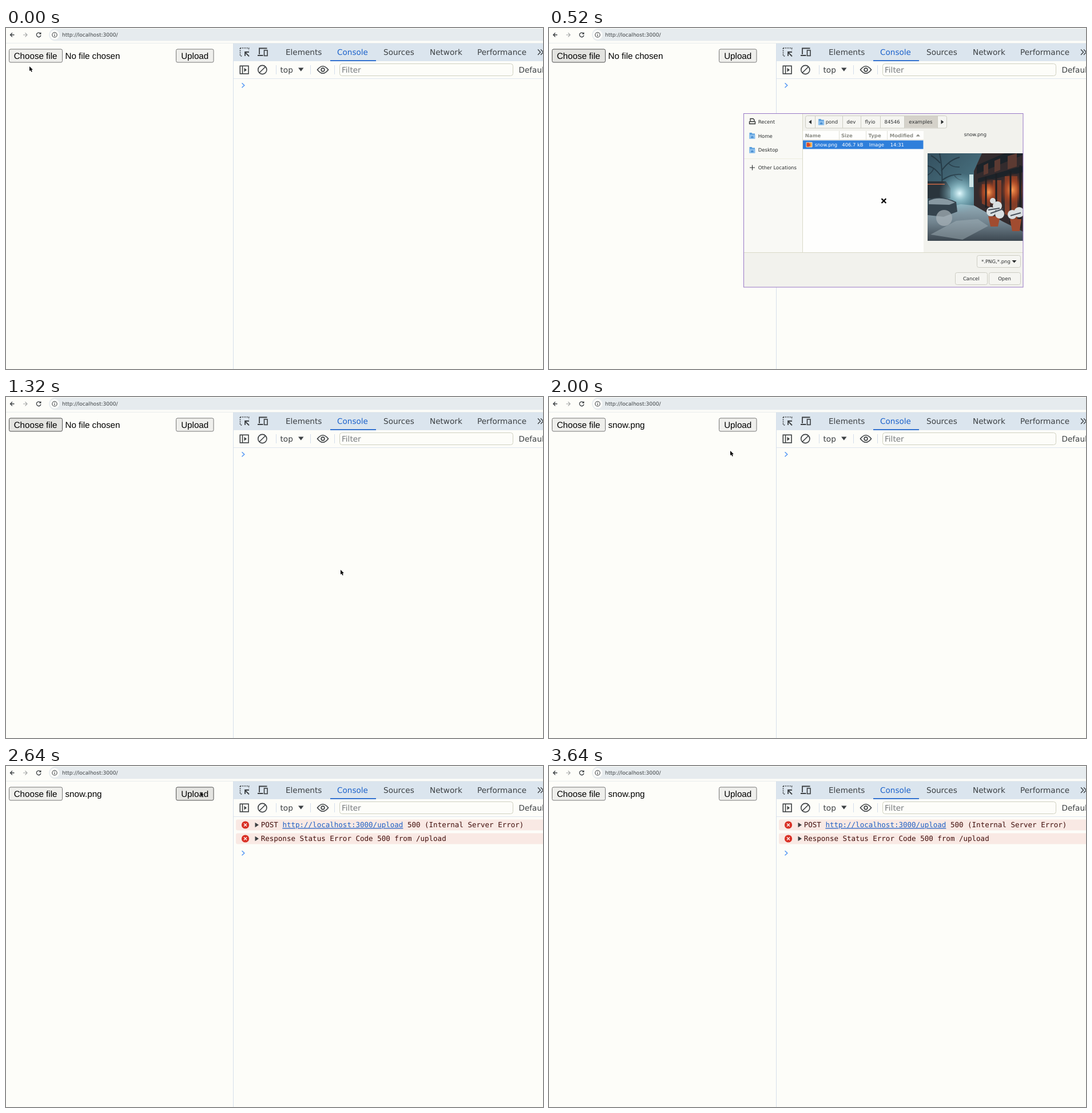
An HTML page that plays this animation: 939 by 596 pixels, repeating every 4.4 s.

```html
<!DOCTYPE html>
<html lang="en">
<head>
<meta charset="utf-8">
<title>File upload</title>
<style>
html, body { margin: 0; width: 100%; height: 100%; overflow: hidden; background: #fdfdf9; }
svg { display: block; width: 939px; height: 596px; text-rendering: geometricPrecision; }
text { white-space: pre; }
.ui { font: 13.6px "DejaVu Sans", sans-serif; fill: #3c4043; }
.page { font: 15.15px "Liberation Sans", Arial, sans-serif; fill: #000; }
.log { font: 12.52px "DejaVu Sans Mono", monospace; fill: #410e0b; }
.gtk { font: 8.5px "DejaVu Sans", sans-serif; fill: #2a2d2e; }
.head { font-weight: bold; fill: #8d8e87; }
.line { fill: none; stroke: #3c4043; stroke-width: 1.6; }
.btn { fill: #efefec; stroke: #767676; }
.gbtn { fill: #f5f5f1; stroke: #cdcdc3; }

/* Percentages are ms / 44, set a hair early so each change lands on its tick. */
.anim { animation: 4400ms step-end infinite; }
#arrow { animation-name: move; }
@keyframes move {
  0% { transform: translate(41px, 67px); animation-timing-function: steps(6); }
  5.44% { transform: translate(48px, 50px); }
  35.44% { transform: translate(585px, 302px); animation-timing-function: steps(5); }
  39.99% { transform: translate(432px, 184px); animation-timing-function: steps(6); }
  45.44% { transform: translate(317px, 94px); animation-timing-function: steps(3); }
  48.17% { transform: translate(325px, 70px); animation-timing-function: steps(7); }
  54.53% { transform: translate(340px, 45px); }
  73.62% { transform: translate(399px, 41px); animation-timing-function: steps(5); }
  78.17%, 100% { transform: translate(921px, 24px); }
}
#pointer { animation-name: pointer; }
@keyframes pointer {
  0%, 29.99% { visibility: visible; }
  9.08%, 81.8%, 100% { visibility: hidden; }
}
/* The arrow waits at the dialog's centre once the dialog has closed. */
#place { animation-name: place; }
@keyframes place {
  0%, 35.43%, 100% { transform: none; }
  29.99% { transform: translate(537px, 252px); }
}
#frame { animation-name: frame; }
@keyframes frame {
  0%, 29.99%, 100% { visibility: hidden; }
  9.08% { visibility: visible; }
}
#dialog { animation-name: dialog; }
@keyframes dialog {
  0%, 29.99%, 100% { visibility: hidden; }
  10.89% { visibility: visible; }
}
#next { animation-name: next; }
@keyframes next { 0% { fill: #2a2d2e; } 13.62% { fill: #5f605b; } 14.53%, 100% { fill: #95968e; } }
#open { animation-name: open; }
@keyframes open { 0% { fill: #f5f5f1; } 24.53%, 100% { fill: #d5d2ca; } }
#choose { animation-name: choose; }
@keyframes choose { 0%, 30.89%, 100% { fill: #efefec; stroke: #767676; } 2.71% { fill: #e3e3e0; stroke: #4f4f4f; } }
#upload { animation-name: upload; }
@keyframes upload { 0%, 74.53%, 100% { fill: #efefec; stroke: #767676; } 50.89% { fill: #e4e4e1; stroke: #4f4f4f; } }
#none { animation-name: none-chosen; }
@keyframes none-chosen { 0% { visibility: visible; } 30.89%, 100% { visibility: hidden; } }
#chosen { animation-name: chosen; }
@keyframes chosen { 0% { visibility: hidden; } 30.89%, 100% { visibility: visible; } }
#errors { animation-name: errors; }
@keyframes errors { 0% { visibility: hidden; } 59.08%, 100% { visibility: visible; } }
#prompt { animation-name: prompt; }
@keyframes prompt { 0% { transform: none; } 59.08%, 100% { transform: translateY(52px); } }
</style>
</head>
<body>
<svg viewBox="0 0 939 596">
  <defs>
    <linearGradient id="sky" x2="1" y2="1">
      <stop offset="0" stop-color="#34505f"/><stop offset=".5" stop-color="#4d7886"/><stop offset="1" stop-color="#283038"/>
    </linearGradient>
    <linearGradient id="ground" x2="0" y2="1">
      <stop offset="0" stop-color="#93adb8"/><stop offset=".5" stop-color="#71838e"/><stop offset="1" stop-color="#3c4750"/>
    </linearGradient>
    <radialGradient id="glow">
      <stop offset="0" stop-color="#e3fbff"/><stop offset=".35" stop-color="#9fd0da" stop-opacity=".75"/><stop offset="1" stop-color="#73a9b8" stop-opacity="0"/>
    </radialGradient>
    <radialGradient id="lamp">
      <stop offset="0" stop-color="#ff9b52"/><stop offset=".5" stop-color="#b04a25" stop-opacity=".8"/><stop offset="1" stop-color="#6a2a1c" stop-opacity="0"/>
    </radialGradient>
    <clipPath id="photo"><path d="M662 219h167v153h-167z"/></clipPath>
    <g id="folder">
      <path d="M.5 0h4l1 1.5h4.5v9h-9.5z" fill="#5a9fdd"/>
      <path d="M0 3.5h10.5v7h-10.5z" fill="#8fc1ee"/>
      <path d="M3 7.5l2.3-2 2.3 2v1.8h-4.6z" fill="#4a8ed0"/>
    </g>
    <g id="fault">
      <path d="M405-9.5h534v19h-534a3 3 0 0 1-3-3v-13a3 3 0 0 1 3-3z" fill="#f9e9e4"/>
      <circle cx="418.5" r="6.6" fill="#d93025"/>
      <path d="M416-2.5l5 5m0-5l-5 5" stroke="#fff" stroke-width="1.3"/>
      <path d="M435.500-4.300l6.500 4.300-6.500 4.300z" fill="#3c4043"/>
    </g>
  </defs>

  <!-- Address bar -->
  <path d="M939 1H86a10.800 10.800 0 0 0 0 21.600h853z" fill="#e6ebee"/>
  <path d="M0 26.500h939" stroke="#e8ecec"/>
  <path d="M14.500 12h-7m3.500-3.500l-3.500 3.500 3.500 3.500" class="line" stroke-width="1.2" style="stroke-width:1.3"/>
  <path d="M30 12h7m-3.500-3.500l3.500 3.500-3.500 3.500" class="line" style="stroke:#a6a8a8;stroke-width:1.2"/>
  <path d="M60.300 9.800a3.800 3.800 0 1 0 .6 2.800m-.1-4.800v2.500h-2.500" class="line" style="stroke-width:1.300"/>
  <circle cx="85" cy="12" r="8.300" fill="#fdfdfb"/>
  <circle cx="85" cy="12" r="4.200" class="line" style="stroke-width:1.100"/>
  <path d="M85 11.500v3m0-5v1.100" class="line" style="stroke-width:1.200"/>
  <text x="98" y="15.200" class="ui" style="font-size:9.070px">http://localhost:3000/</text>

  <!-- Page -->
  <g class="page">
    <rect id="choose" class="btn anim" x="5.500" y="37" width="93" height="23" rx="2.500"/>
    <text x="13.700" y="53.500">Choose file</text>
    <text id="none" class="anim" x="103.500" y="53.500">No file chosen</text>
    <text id="chosen" class="anim" x="103.500" y="53.500">snow.png</text>
    <rect id="upload" class="btn anim" x="297.500" y="37" width="65.500" height="23" rx="2.500"/>
    <text x="306.200" y="53.500">Upload</text>
  </g>

  <!-- Developer tools -->
  <path d="M398 27h541v31h-541z" fill="#dbe5ee"/>
  <path d="M397.500 27v569" stroke="#d6dfeb"/>
  <path d="M398 88.500h541" stroke="#dfe6ef"/>
  <path d="M567 57.200h80" stroke="#1b62cb" stroke-width="1.800"/>
  <g class="line">
    <path d="M409.500 35h15v4m-15-4v14h4" stroke-dasharray="2 1.700"/>
    <path d="M425 49.500l-7-7m0 6.500v-7h7" stroke-width="1.800"/>
    <path d="M443 46v-10.500h13.500M440 48h9.500" stroke-width="1.800"/>
    <rect x="451.500" y="39" width="5.500" height="9.500"/>
    <rect x="409.300" y="66.300" width="14.700" height="13.700"/>
    <path d="M413.500 66v14"/>
    <circle cx="448.300" cy="73" r="7.600"/>
    <path d="M443 78.300l10.600-10.600"/>
    <path d="M544.500 73q9.500-12.500 19 0q-9.500 12.500-19 0z"/>
    <circle cx="554" cy="73" r="2.900"/>
    <path d="M930 37.500l4.500 4.700-4.500 4.700m5-9.400l4.500 4.700-4.500 4.700" stroke-width="1.400"/>
  </g>
  <path d="M416.500 69.700l4.500 3.500-4.500 3.500zM511 69.500h9.500l-4.750 6.300z" fill="#3c4043"/>
  <path d="M472.500 65v16M532.500 65v16M574.500 65v16" stroke="#d5deeb"/>
  <rect x="583.500" y="62.500" width="303" height="21" rx="4" fill="#fdfdf9" stroke="#cfd0c0"/>
  <g class="ui">
    <text x="489" y="47">Elements</text>
    <text x="579" y="47" style="fill:#1b62cb">Console</text>
    <text x="660" y="47">Sources</text>
    <text x="741" y="47">Network</text>
    <text x="824" y="47">Performance</text>
    <text x="479.500" y="77.500">top</text>
    <text x="587" y="77.800" style="fill:#777b7e">Filter</text>
    <text x="896.500" y="77.500">Default levels</text>
  </g>
  <path id="prompt" class="anim" d="M412.500 96.300l4.300 4-4.300 4" fill="none" stroke="#4d92f4" stroke-width="1.400"/>
  <g id="errors" class="anim log">
    <use href="#fault" y="103"/>
    <use href="#fault" y="127"/>
    <text x="445.700" y="107.300">POST <tspan fill="#1f5fc4" text-decoration="underline">http://localhost:3000/upload</tspan> 500 (Internal Server Error)</text>
    <text x="445.700" y="131">Response Status Error Code 500 from /upload</text>
  </g>

  <!-- File chooser -->
  <g id="dialog" class="anim gtk">
    <path d="M341 150h488v303h-488z" fill="#f2f2ed"/>
    <path d="M341 150h102v242h-102z" fill="#f9f9f5"/>
    <path d="M444 180h211v212h-211z" fill="#fefefd"/>
    <path d="M443.500 150v242M341 392.500h488" stroke="#d9d9c8"/>
    <path d="M341 228.500h102" stroke="#ededdf"/>

    <path d="M352 158.500h5l2 2v3h-7zM350.500 163v4.500h10v-4.500" fill="none" stroke="#2a2d2e" stroke-width="1.300"/>
    <use href="#folder" x="350" y="183"/>
    <use href="#folder" x="350" y="208"/>
    <path d="M351 244h9m-4.500-4.500v9" stroke="#2a2d2e" stroke-width="1.100"/>
    <text x="365.700" y="167">Recent</text>
    <text x="365.700" y="191.500">Home</text>
    <text x="365.700" y="216.300">Desktop</text>
    <text x="365.700" y="247">Other Locations</text>

    <rect class="gbtn" x="448.500" y="153.500" width="247" height="21.500" rx="3"/>
    <path d="M621 154h58.500v20.500h-58.500z" fill="#d5d2ca"/>
    <path d="M465.500 154v21M513.500 154v21M545.500 154v21M579.500 154v21M621.500 154v21M679.500 154v21" stroke="#cdcdc3"/>
    <path d="M459 160.500v7.500l-4.800-3.750z"/>
    <path id="next" class="anim" d="M685.500 160.500v7.500l4.800-3.750z"/>
    <use href="#folder" x="470.800" y="159"/>
    <text x="483.700" y="167.300">pond</text>
    <text x="520.500" y="167.300">dev</text>
    <text x="552.500" y="167.300">flyio</text>
    <text x="586.500" y="167.300">84546</text>
    <text x="629.300" y="167.300">examples</text>

    <path d="M444 195.500h211M507.500 180v15M554.500 180v15M591.500 180v15" stroke="#deded6"/>
    <g class="head">
      <text x="447.800" y="191">Name</text>
      <text x="511" y="191">Size</text>
      <text x="558.500" y="191">Type</text>
      <text x="595.700" y="191">Modified</text>
      <path d="M641.500 189.500h7.500l-3.750-4z"/>
    </g>
    <path d="M444 196.500h210.500v15h-210.500z" fill="#2f7fdb"/>
    <rect x="449.500" y="199.500" width="11" height="9" rx="1" fill="#f3e7d5"/>
    <path d="M450.500 200.500h9v7h-9z" fill="#f3a33b"/>
    <path d="M450.500 200.500h4l2.500 4-2 3h-4.500z" fill="#d9492b"/>
    <g fill="#fff" style="font-size:8.400px">
      <text x="464.700" y="207.200">snow.png</text>
      <text x="512.300" y="207.200">406.7 kB</text>
      <text x="559.700" y="207.200">Image</text>
      <text x="596.700" y="207.200">14:31</text>
    </g>
    <text x="745.300" y="188.800" text-anchor="middle" style="font-size:8.350px">snow.png</text>

    <!-- Snowy street at night -->
    <g clip-path="url(#photo)">
      <path d="M662 219h167v153h-167z" fill="url(#sky)"/>
      <path d="M662 322l58-14 42 4 67 40v20h-167z" fill="url(#ground)"/>
      <g fill="none" stroke="#22343f" stroke-width="1.500" opacity=".8">
        <path d="M686 292q4-38-3-73M685 258q-12-16-23-17M686 250q14-20 32-24M687 266q18-12 34-10M684 236q-8-9-16-13" stroke-width="2"/>
        <path d="M698 236q8 8 20 7M673 245q-4 9-11 12M709 258q6 8 14 8"/>
      </g>
      <path d="M662 268h32l8 12v18h-40z" fill="#29343c"/>
      <path d="M662 273h30" stroke="#a55c43" stroke-width="2"/>
      <circle cx="718" cy="289" r="36" fill="url(#glow)"/>
      <path d="M735 256h7v22h-7z" fill="#cfe6e8"/>
      <path d="M743 250l14-31h72v137l-36-18-50-28z" fill="#332b2d"/>
      <path d="M748 240l81-35v17l-81 33zM750 263l79-22v11l-79 18z" fill="#1c2329"/>
      <path d="M757 273h14v40l-14-6zM776 266h15v55l-15-8zM797 259h22v78l-22-12z" fill="#84402b"/>
      <path d="M760 240l8-4v18l-8 3zM779 232l10-4v20l-10 4zM802 224l16-5v23l-16 5z" fill="#5c3a32"/>
      <ellipse cx="769" cy="287" rx="19" ry="25" fill="url(#lamp)"/>
      <ellipse cx="810" cy="283" rx="22" ry="31" fill="url(#lamp)"/>
      <path d="M764 260v54M782 254v72M807 250v91M824 240v110" stroke="#1c1f23" stroke-width="3"/>
      <path d="M663 300q20-9 49 4l2 17-24 9-28-3z" fill="#35444e"/>
      <path d="M664 302q20-10 46 3l-10 4-36-1z" fill="#8899a2"/>
      <circle cx="691" cy="332" r="14" fill="#aab4b9" opacity=".7"/>
      <path d="M667 361l45-24 38-3 18 12-45 24z" fill="#a7b6bd" opacity=".45"/>
      <path d="M768 329h21l-4 18h-13zM806 334h20l-3 21h-13z" fill="#a14c30"/>
      <g fill="#d9dfe1">
        <circle cx="773" cy="321" r="8"/><circle cx="784" cy="311" r="8"/><circle cx="788" cy="325" r="8"/>
        <circle cx="810" cy="326" r="8"/><circle cx="822" cy="322" r="9"/><circle cx="776" cy="302" r="5"/>
      </g>
      <path d="M768 318l20-3m-16 9l22-8m13 12l18-5" stroke="#48505a" stroke-width="2"/>
    </g>

    <rect class="gbtn" x="748.500" y="397.500" width="76" height="21" rx="3"/>
    <text x="756" y="411">*.PNG,*.png</text>
    <path d="M809.500 406h8l-4 4.500z"/>
    <rect class="gbtn" x="710.500" y="427.500" width="56" height="21" rx="3"/>
    <text x="738.300" y="441" text-anchor="middle">Cancel</text>
    <rect id="open" class="gbtn anim" x="769.500" y="427.500" width="55" height="21" rx="3"/>
    <text x="796.500" y="441" text-anchor="middle">Open</text>
  </g>
  <g id="frame" class="anim" fill="none">
    <rect x="340.500" y="149.500" width="488.500" height="303.500" stroke="#9878c6"/>
    <path d="M581.500 298.200l7.800 7.800m0-7.800l-7.800 7.800" stroke="#fff" stroke-width="4.200"/>
    <path d="M581.500 298.200l7.800 7.800m0-7.800l-7.800 7.800" stroke="#000" stroke-width="2.300"/>
  </g>
  <g id="pointer" class="anim">
    <g id="place" class="anim">
      <path id="arrow" class="anim" d="M0 0v8.200l1.900-1.700 1.400 3.200 1.500-.7-1.400-3h2.500z" fill="#000" stroke="#fff" stroke-width="1" paint-order="stroke"/>
    </g>
  </g>
</svg>
</body>
</html>
```
